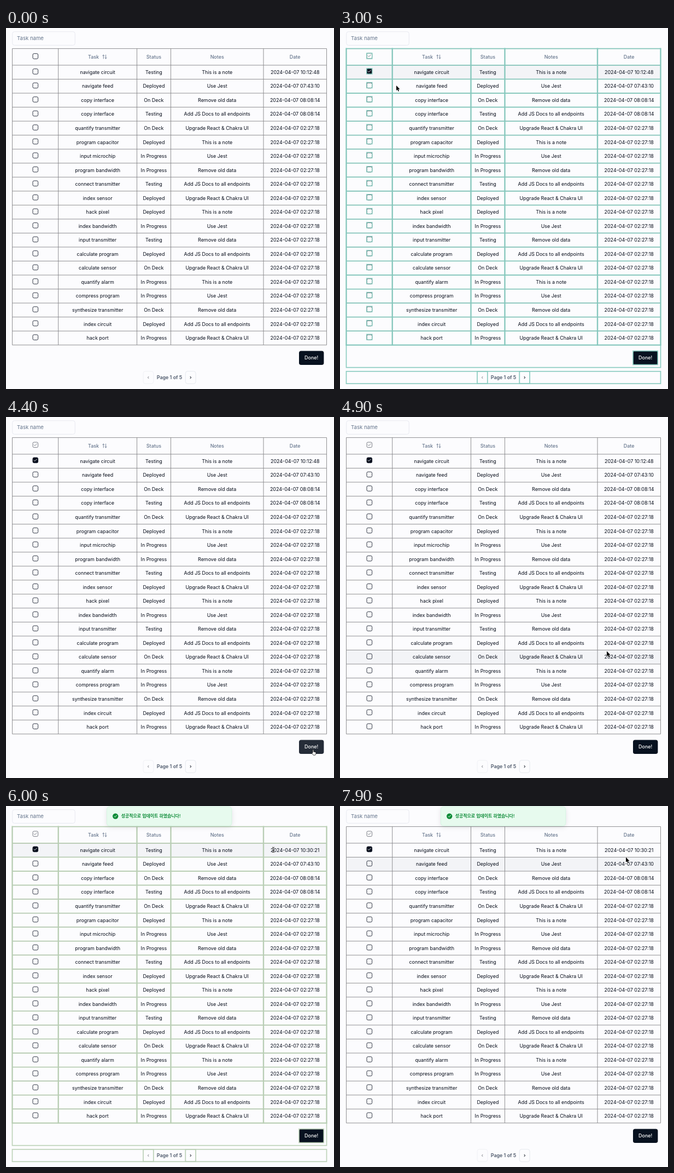
Write an HTML page that moves like this. It is 600x659 px and loops after 8000 ms.

```html
<!DOCTYPE html>
<html lang="ko">
<head>
<meta charset="utf-8">
<title>Task table</title>
<style>
html, body { margin: 0; width: 100%; height: 100%; overflow: hidden; background: #fcfcfe; }
svg { display: block; width: 600px; height: 659px; }
text { font: 400 8.94px Inter, sans-serif; fill: #050b18; white-space: pre; }
.mid { text-anchor: middle; }
.head { font-weight: 500; fill: #64748b; }
.toast { font: 600 7.9px "Noto Sans CJK KR", "Noto Sans CJK", sans-serif; fill: #0a8a35; }
</style>
</head>
<body>
<svg id="stage" viewBox="0 0 600 659"></svg>
<script>
const NS = 'http://www.w3.org/2000/svg';
const stage = document.getElementById('stage');

function el(tag, attrs, parent = stage, content) {
  const node = document.createElementNS(NS, tag);
  for (const k in attrs) node.setAttribute(k, attrs[k]);
  if (content) node.textContent = content;
  parent.appendChild(node);
  return node;
}
const rect = (x, y, width, height, attrs, parent) =>
  el('rect', { x, y, width, height, fill: 'none', ...attrs }, parent);
const path = (d, attrs, parent) => el('path', { d, fill: 'none', ...attrs }, parent);
const label = (x, y, s, attrs, parent) => el('text', { x, y, class: 'mid', ...attrs }, parent, s);
const show = (node, on) => node.setAttribute('display', on ? 'inline' : 'none');

const LOOP = 8000, STEP = 100;
const TOP = 37.6, BODY = 67.9, ROW = 25.54, ROWS = 20, BOTTOM = BODY + ROW * ROWS;
const LEFT = 11.5, RIGHT = 586.5;
const COLS = [LEFT, 95.7, 239.5, 301.5, 471, RIGHT];
const MID = [53.8, 167.6, 270.4, 386.2, 528.7];
const CHECK = 'M20 6 9 17l-5-5';

const TASKS = ['navigate circuit', 'navigate feed', 'copy interface', 'copy interface',
  'quantify transmitter', 'program capacitor', 'input microchip', 'program bandwidth',
  'connect transmitter', 'index sensor', 'hack pixel', 'index bandwidth', 'input transmitter',
  'calculate program', 'calculate sensor', 'quantify alarm', 'compress program',
  'synthesize transmitter', 'index circuit', 'hack port'];
const STATUS = { T: 'Testing', D: 'Deployed', O: 'On Deck', P: 'In Progress' };
const STATES = 'TDOTODPPTDDPTDOPPODP';
const NOTES = ['This is a note', 'Use Jest', 'Remove old data', 'Add JS Docs to all endpoints',
  'Upgrade React & Chakra UI'];
const TIMES = ['10:12:48', '07:43:10', '08:08:14', '08:08:14'];
const rowData = i => [TASKS[i], STATUS[STATES[i]], NOTES[i % 5], '2024-04-07 ' + (TIMES[i] || '02:27:18')];

// Search field
rect(11.7, 6.7, 114.6, 24.8, { rx: 3.8, stroke: '#e2e5ec', 'stroke-width': .8 });
el('text', { x: 20, y: 22.4, class: 'head', style: 'font-size:9.6px;font-weight:400' }, stage, 'Task name');

// Table
const hover = rect(LEFT, BODY, RIGHT - LEFT, ROW, { fill: '#f3f4f7' });
let grid = '';
COLS.forEach(x => grid += `M${x} ${TOP}V${BOTTOM}`);
const lines = [TOP];
for (let i = 0; i <= ROWS; i++) lines.push(BODY + ROW * i);
lines.forEach(y => grid += `M${LEFT} ${y}H${RIGHT}`);
path(grid, { stroke: '#858587', 'stroke-width': .9 });

['Task', 'Status', 'Notes', 'Date'].forEach((s, i) =>
  label(i ? MID[i + 1] : 160, 55.8, s, { class: 'mid head' }));
path('m21 16-4 4-4-4M17 20V4M3 8l4-4 4 4M7 4v16', {
  transform: 'translate(175.3 47.4) scale(.426)', stroke: '#64748b', 'stroke-width': 2,
  'stroke-linecap': 'round', 'stroke-linejoin': 'round' });

function checkbox(cy, fill, stroke, tick) {
  const g = el('g', { transform: `translate(${MID[0]} ${cy})` });
  rect(-4.8, -4.8, 9.6, 9.6, { rx: 2.3, fill, stroke, 'stroke-width': .9 }, g);
  if (tick) path(CHECK, { transform: 'translate(-4.1 -4.1) scale(.34)', stroke: tick, 'stroke-width': 2.6,
    'stroke-linecap': 'round', 'stroke-linejoin': 'round' }, g);
  return g;
}
const boxY = i => BODY + ROW * i + 11.5;
const unchecked = [checkbox(51.5, 'none', '#1b2230')];
const checked = [checkbox(50.8, 'none', '#6c7079', '#6c7079'), checkbox(78.9, '#080f1e', '#080f1e', '#fff')];
let firstDate;
for (let i = 0; i < ROWS; i++) {
  const box = checkbox(boxY(i), 'none', '#1b2230');
  if (!i) unchecked.push(box);
  rowData(i).forEach((s, c) => {
    const t = label(MID[c + 1], BODY + ROW * i + 15.9, s);
    if (!i && c === 3) firstDate = t;
  });
}

// Footer
const done = rect(536, 589.4, 45.4, 25.6, { rx: 3.8, fill: '#07111f' });
label(558.7, 605.4, 'Done!', { style: 'fill:#fff;font-weight:500' });
const pager = (x, s, stroke, fill) => {
  rect(x, 626.7, 18.8, 22.6, { rx: 3.8, stroke, 'stroke-width': .8 });
  label(x + 9.4, 641, s, { style: `fill:${fill};font-weight:500` });
};
pager(251, '‹', '#eceef3', '#85888f');
pager(328.3, '›', '#e0e4eb', '#050b18');
label(299, 641.2, 'Page 1 of 5', { style: 'fill:#505b6d;font-weight:600' });

// Render highlights
const flash = el('g', { 'stroke-opacity': .92 });
path(COLS.map(x => `M${x} ${TOP - 1}V${BOTTOM + 1}`).join(''), { 'stroke-width': 2.4 }, flash);
path(lines.map(y => `M${LEFT} ${y}H${RIGHT}`).join(''), { 'stroke-width': 1.8 }, flash);
rect(LEFT, BOTTOM, RIGHT - LEFT, 41, { 'stroke-width': 1.7 }, flash);
rect(LEFT, 626.8, RIGHT - LEFT, 22.4, { 'stroke-width': 1.7 }, flash);
[[251, 626.8, 18.8, 22.4], [328.3, 626.8, 18.8, 22.4], [536, 589.6, 45.2, 25]].forEach(b =>
  rect(...b, { 'stroke-width': 1.7 }, flash));
const boxFlash = el('g', { 'stroke-width': 1.5 }, flash);
for (let i = -1; i < ROWS; i++)
  rect(MID[0] - 5, (i < 0 ? 51 : boxY(i) - .5) - 5, 10, 10, {}, boxFlash);

const FLASHES = [
  { from: 2800, to: 3200, color: '#84c9bd', boxes: true },
  { from: 4500, to: 4800, color: '#9fccb5' },
  { from: 5700, to: 6200, color: '#b9d0b3' }
];

// Toast
const toast = el('g', { style: 'filter:drop-shadow(0 2.5px 4px rgba(0,0,0,.1))' });
rect(184.4, 1.2, 228.4, 35, { rx: 5, fill: '#e7faee', stroke: '#cbf6dc', 'stroke-width': .7 }, toast);
el('circle', { cx: 200.2, cy: 18.6, r: 5.2, fill: '#0a8a35' }, toast);
path('m197.9 18.8 1.6 1.6 3-3.6', { stroke: '#e7faee', 'stroke-width': 1,
  'stroke-linecap': 'round', 'stroke-linejoin': 'round' }, toast);
el('text', { x: 210.8, y: 21.4, class: 'toast' }, toast, '성공적으로 업데이트 하였습니다!');

// Pointer
const cursor = el('g', {});
const shapes = { arrow: el('g', {}, cursor), beam: el('g', {}, cursor), hand: el('g', {}, cursor) };
path('M0 0v9.2l2.1-1.9 1.5 3.4 1.5-.6-1.5-3.3h2.9z',
  { fill: '#000', stroke: '#fff', 'stroke-width': .7, 'paint-order': 'stroke' }, shapes.arrow);
const beam = 'M-2-4.8Q0-4.8 0-3.5 0-4.8 2-4.8M0-3.5v7M-2 4.8Q0 4.8 0 3.5 0 4.8 2 4.8M-1.2 1.4h2.4';
path(beam, { stroke: '#fff', 'stroke-width': 1.9 }, shapes.beam);
path(beam, { stroke: '#111', 'stroke-width': .9 }, shapes.beam);
path('M-.9 5.4V.9a.85.85 0 0 1 1.7 0V4l3.1.7q1.1.3 1.1 1.5l-.4 2.4-.8 1.6H.2L-2.6 6.6q.5-1.3 1.7-.4z',
  { fill: '#fff', stroke: '#000', 'stroke-width': .7 }, shapes.hand);

const TRACK = [ // time, x, y
  [1500, 574, 81], [1800, 574, 81], [2200, 170, 74], [2550, 54, 80], [2850, 54, 80],
  [3000, 103, 105], [3300, 200, 210], [4000, 562, 607], [4500, 562, 607], [4800, 489, 438],
  [4900, 488, 427.5], [5050, 488, 427.5], [5500, 487, 86], [5800, 489, 80], [6600, 489, 80],
  [7050, 572, 81], [7350, 572, 81], [7700, 523, 93.6], [8000, 523, 93.6]
];

function slope(i, k) {
  const p = TRACK[i - 1], q = TRACK[i], r = TRACK[i + 1];
  if (!p || !r || p[k] === q[k] || q[k] === r[k] || (q[k] - p[k]) * (r[k] - q[k]) < 0) return 0;
  return (r[k] - p[k]) / (r[0] - p[0]);
}
function pointerAt(t) {
  if (t < TRACK[0][0]) return null;
  let i = 0;
  while (i < TRACK.length - 2 && t >= TRACK[i + 1][0]) i++;
  const a = TRACK[i], b = TRACK[i + 1], d = b[0] - a[0], u = (t - a[0]) / d;
  return [1, 2].map(k => {
    const s = u * u * (3 - 2 * u);
    return a[k] + (b[k] - a[k]) * s
      + slope(i, k) * d * u * (1 - u) * (1 - u) - slope(i + 1, k) * d * u * u * (1 - u);
  });
}
const overDone = p => p && p[0] > 536 && p[0] < 581.4 && p[1] > 589.4 && p[1] < 615;
function rowAt(p) {
  const i = p ? Math.floor((p[1] - BODY) / ROW) : -1;
  return i < ROWS && p && p[0] > LEFT && p[0] < RIGHT ? i : -1;
}
function shapeAt(p) {
  const i = rowAt(p);
  if (overDone(p)) return 'hand';
  if (i < 0) return 'arrow';
  if (Math.abs(p[0] - MID[0]) < 5.5 && Math.abs(p[1] - boxY(i)) < 5.5) return 'hand';
  const overText = rowData(i).some((s, c) => Math.abs(p[0] - MID[c + 1]) < s.length * 2.45);
  return overText && Math.abs(p[1] - BODY - ROW * i - 12.7) < 6 ? 'beam' : 'arrow';
}

function render(t) {
  const p = pointerAt(t);
  show(cursor, p);
  if (p) {
    cursor.setAttribute('transform', `translate(${p[0]} ${p[1]})`);
    const kind = shapeAt(p);
    for (const k in shapes) show(shapes[k], k === kind);
  }
  // Row shading trails the pointer slightly
  const row = rowAt(pointerAt(t < 1600 ? t : t - 100));
  show(hover, row >= 0);
  hover.setAttribute('y', BODY + ROW * Math.max(row, 0));
  done.setAttribute('fill', overDone(p) ? '#252c38' : '#07111f');

  const on = t >= 2800;
  checked.forEach(n => show(n, on));
  unchecked.forEach(n => show(n, !on));
  firstDate.textContent = '2024-04-07 ' + (t >= 5700 ? '10:30:21' : TIMES[0]);

  const f = FLASHES.find(f => t >= f.from && t < f.to);
  show(flash, f);
  if (f) {
    flash.setAttribute('stroke', f.color);
    show(boxFlash, f.boxes);
  }

  const k = Math.min(1, Math.max(0, (t - 5400) / 400)), e = 1 - (1 - k) ** 3;
  show(toast, k > 0);
  toast.setAttribute('transform', `translate(0 ${-37 * (1 - e)})`);
  toast.setAttribute('opacity', e);
}

const start = performance.now();
function tick() {
  const t = (performance.now() - start) % LOOP;
  render(Math.floor(t / STEP) * STEP);
  requestAnimationFrame(tick);
}
render(0);
requestAnimationFrame(tick);
</script>
</body>
</html>
```
